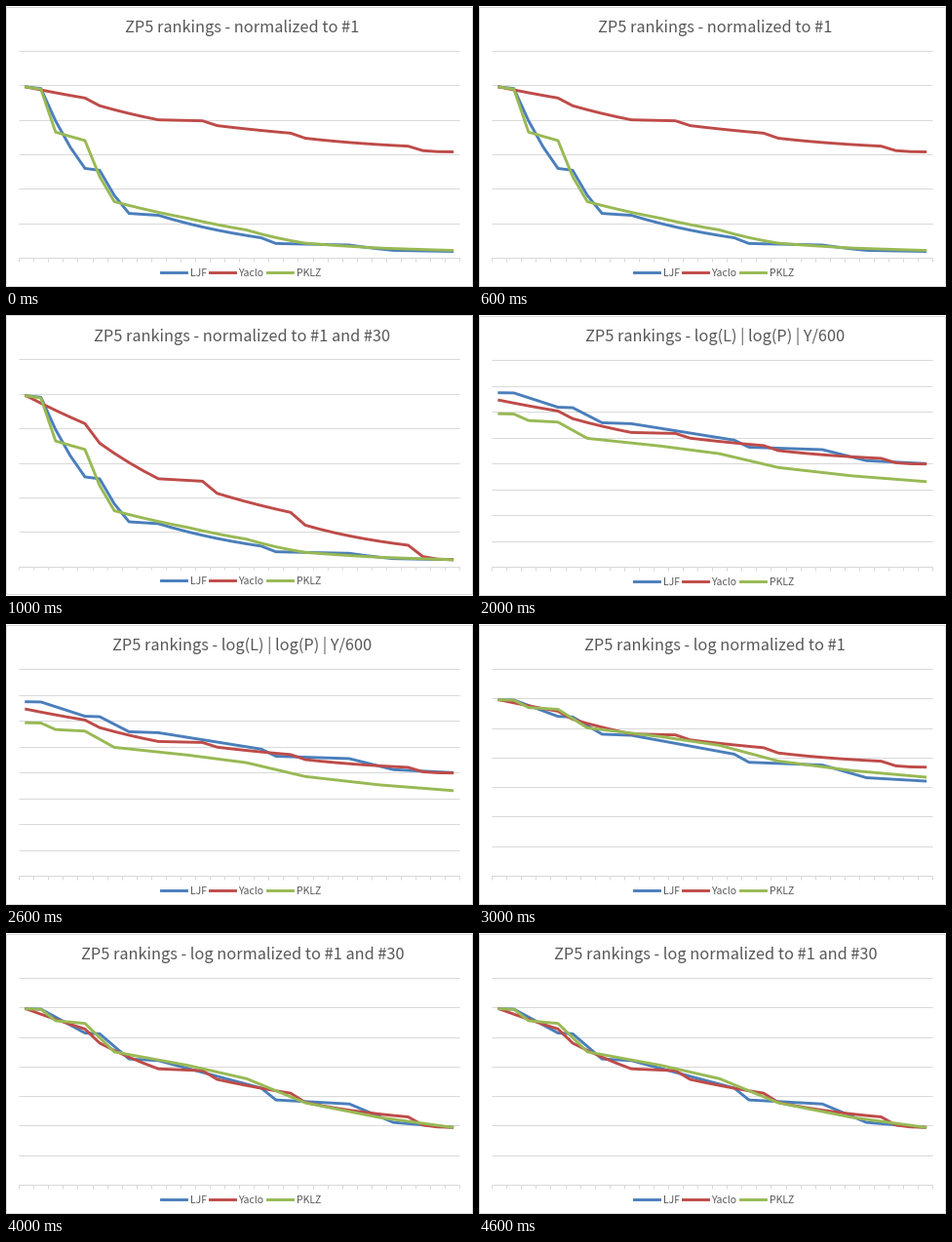
Animation of 479x288 px, one loop 5000 ms. Source, as a matplotlib script:

```python
import numpy as np
import matplotlib.pyplot as plt
from matplotlib.animation import FuncAnimation
from matplotlib.patches import Rectangle

W, H, DPI = 479, 288, 64
PT = 72 / DPI  # points per pixel
LEFT, RIGHT, TOP, BASE = 13.2, 465.2, 46.05, 258.05
COUNT = 30
GRID, INK = "#d9d9d9", "#595959"
FONT = "Noto Sans CJK JP"

ranks = np.arange(1, COUNT + 1)
step = (RIGHT - LEFT) / COUNT
xs = LEFT + step * (ranks - 0.5)


def falling(keys):
    """Scores with a constant rate of decay between (rank, score) keys."""
    at, score = zip(*keys)
    return np.exp(np.interp(ranks, at, np.log(score)))


LJF = falling([(1, 1000), (2, 991), (5, 526), (6, 515), (8, 264), (10, 253),
               (17, 122), (18, 89), (23, 80), (26, 49), (30, 43)])
PKLZ = falling([(1, 1000), (2, 987), (3, 737), (5, 688), (7, 332), (12, 235),
                (16, 167), (20, 90), (25, 62), (30, 48)])
YACLO = falling([(1, 1000), (5, 830), (6, 711), (10, 494), (13, 479),
                 (14, 405), (19, 289), (20, 211), (27, 89), (30, 1)])

# name, colour, scores, may use a log scale, legend x
SERIES = [
    ("LJF", "#4a7ebb", LJF, True, 158),
    ("Yaclo", "#be4b48", YACLO, False, 207.5),
    ("PKLZ", "#98b954", PKLZ, True, 267),
]

# title, grid intervals, log scale, lift, first y and last y of each series
SCENES = [
    ("normalized to #1", 6, False, 0, (83, 83, 83), (251.5, 149.5, 250.5)),
    ("normalized to #1 and #30", 6, False, 0.55, (83.3,) * 3, (251.3,) * 3),
    ("log(L) | log(P) | Y/600", 8, True, 0,
     (79.7, 87.3, 101.2), (152.3, 152.7, 170.7)),
    ("log normalized to #1", 7, True, 0, (77.7,) * 3, (161, 146.7, 156.9)),
    ("log normalized to #1 and #30", 7, True, 0, (77.7,) * 3, (199.2,) * 3),
]

fig = plt.figure(figsize=(W / DPI, H / DPI), dpi=DPI, facecolor="white")
ax = fig.add_axes([0, 0, 1, 1])


def curve(scores, log, first, last):
    vals = np.log(scores) if log else scores
    drop = (vals[0] - vals) / (vals[0] - vals[-1])
    return first + (last - first) * drop


def label(x, y, text, size, ha):
    ax.text(x, y, text, fontsize=size * PT, family=FONT, color=INK,
            ha=ha, va="baseline")


def stroke(x, y, color):
    ax.plot(x, y, color=color, lw=2.9 * PT,
            solid_capstyle="projecting", solid_joinstyle="round")


def draw(i):
    title, rows, log, lift, firsts, lasts = SCENES[i]
    ax.clear()
    ax.set(xlim=(0, W), ylim=(H + lift, lift))
    ax.axis("off")

    ax.add_patch(Rectangle((0, 1), W - 1, H - 2, fill=False, ec=GRID, lw=PT))
    ax.hlines(np.linspace(TOP, BASE, rows + 1), LEFT, RIGHT,
              color=GRID, lw=PT)
    ax.vlines(LEFT + step * np.arange(COUNT + 1), BASE, BASE + 3.5,
              color=GRID, lw=PT)

    for series, first, last in zip(SERIES, firsts, lasts):
        name, color, scores, can_log, x = series
        stroke(xs, curve(scores, log and can_log, first, last), color)
        stroke([x + 1.5, x + 27.5], [273, 273], color)
        label(x + 31, 277, name, 10.5, "left")

    label(242.3, 27.2, "ZP5 rankings - " + title, 16.35, "center")


anim = FuncAnimation(fig, draw, frames=len(SCENES), init_func=lambda: draw(0),
                     interval=1000, repeat=True, repeat_delay=0)
plt.show()
```
